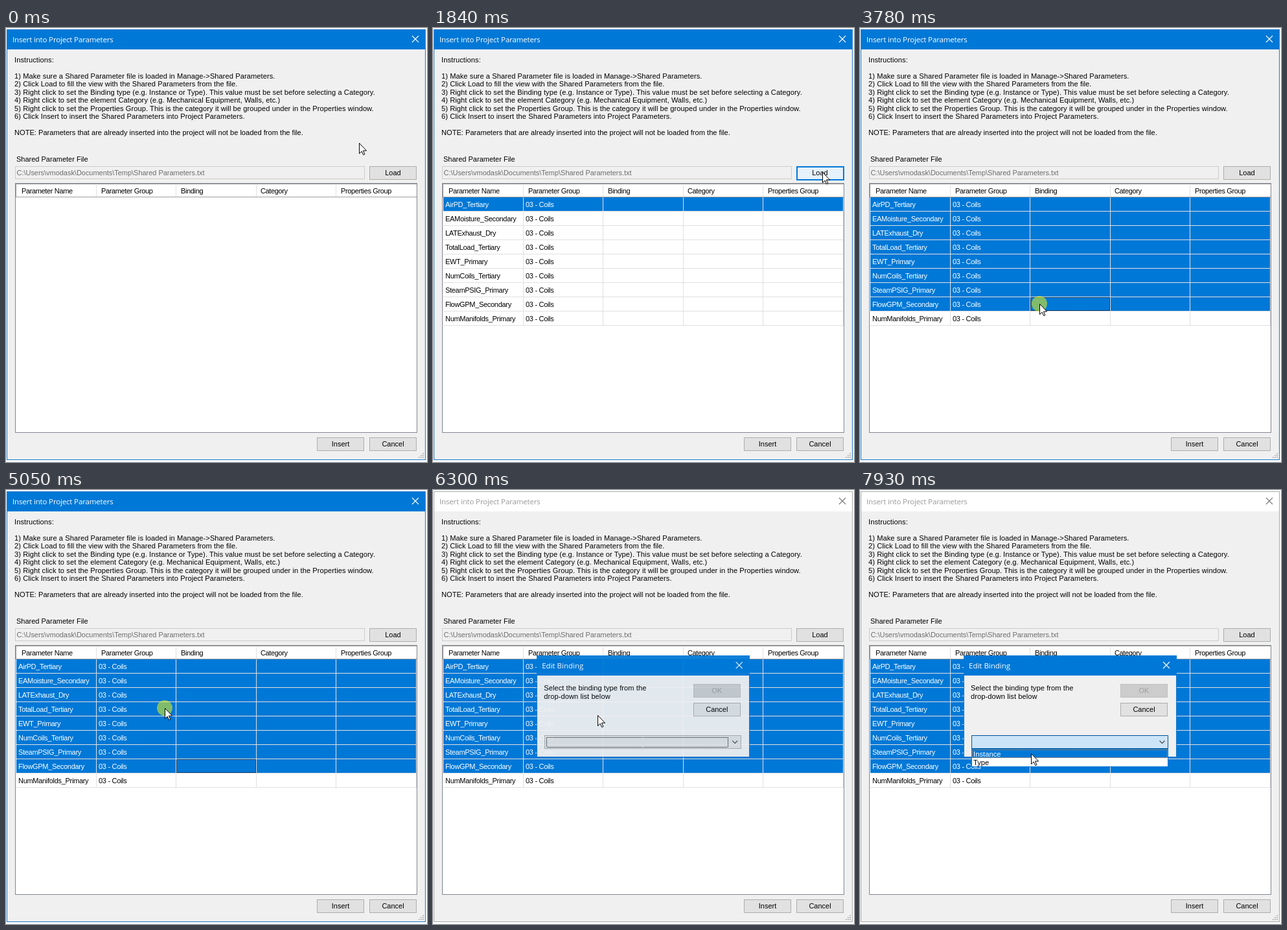
Recreate the animation shown at these times as an HTML page. Size 650 by 669 pixels, loop 8000 ms.

```html
<!DOCTYPE html>
<html lang="en">
<head>
<meta charset="utf-8">
<title>Insert into Project Parameters</title>
<style>
html, body { margin: 0; width: 100%; height: 100%; overflow: hidden; background: #fff; }
svg { display: block; width: 650px; height: 669px; font: 11px "Liberation Sans", Arial, sans-serif; }
rect, line { shape-rendering: crispEdges; }
text { white-space: pre; }
.note { font-size: 11.1px; }
.step { font-size: 11.1px; letter-spacing: .075px; }
.ui { font: 11.5px "Open Sans", "Noto Sans", sans-serif; }
.head { letter-spacing: -.36px; }
.cell { letter-spacing: -.3px; }
.mid { text-anchor: middle; }
.gray { fill: #6d6d6d; letter-spacing: -.03px; }
.line { stroke: #e0e0e0; }
.x { fill: none; stroke: #fff; stroke-width: 1.1; }
.dots { fill: none; stroke: #000; stroke-dasharray: 1 1; }

#frame { fill: #f0f0f0; stroke: #1a79c9; }
#bar { fill: #0078d7; }
#title { fill: #fff; letter-spacing: -.15px; }
.inactive #frame { stroke: #a9a9a9; }
.inactive #bar { fill: #fff; }
.inactive #title { fill: #999; }
.inactive #close { stroke: #777; }

.btn rect { fill: #e1e1e1; stroke: #adadad; }
.off rect { fill: #ccc; stroke: #bfbfbf; }
.off text { fill: #a0a0a0; }
.focus #load rect { stroke: #0078d7; stroke-width: 2; }
.hover #load rect { fill: #e5f1fb; stroke: #0078d7; }
.press #load rect { fill: #cce4f7; stroke: #005499; }

#rows, #cellFocus, #menu, #pick, #list, #ring { visibility: hidden; }
.loaded #rows, .cellFocus #cellFocus, .menu #menu, .pick #pick, .list #list, .ring #ring { visibility: visible; }
.row rect { fill: #fff; }
.row:first-child rect, .multi .row:not(:last-child) rect { fill: #0078d7; }
.row:first-child text, .multi .row:not(:last-child) text { fill: #fff; }

#dialog { transform-origin: 324px 333px; }
#combo { fill: #e1e1e1; stroke: #adadad; }
.over #combo { fill: #e5f1fb; stroke: #0078d7; }
.list #combo { fill: #cce4f7; stroke: #005499; }
.list #comboFocus { visibility: hidden; }
#first rect { fill: #fff; }
.choose #first rect { fill: #0078d7; }
.choose #first text { fill: #fff; }
#first .dots { visibility: hidden; }
.choose #first .dots { visibility: inherit; fill: none; stroke: #ff8728; }
</style>
</head>
<body>
<svg id="stage" viewBox="0 0 650 669"></svg>
<script>
const stage = document.getElementById('stage');

// Markup helpers
const text = (x, y, s, cls = '', more = '') =>
  `<text x="${x}" y="${y}" class="${cls}" ${more}>${s.replace(/>/g, '&gt;')}</text>`;
const fill = (x, y, w, h, color = '', more = '') =>
  `<rect x="${x}" y="${y}" width="${w}" height="${h}" ${color && `fill="${color}"`} ${more}/>`;
const box = (x, y, w, h, more = '') => fill(x + .5, y + .5, w - 1, h - 1, '', more);
const line = (x1, y1, x2, y2, color) =>
  `<line x1="${x1}" y1="${y1}" x2="${x2}" y2="${y2}" ${color ? `stroke="${color}"` : 'class="line"'}/>`;
const button = (x, y, label, id = '', cls = '') =>
  `<g class="btn ${cls}" id="${id}">${box(x, y, 73, 21)}${text(x + 36.5, y + 14, label, 'mid')}</g>`;
const cross = (x, y, id) =>
  `<path class="x" id="${id}" d="M${x - 5} ${y - 5}l10 10m0-10l-10 10"/>`;

const notes = [
  '1) Make sure a Shared Parameter file is loaded in Manage->Shared Parameters.',
  '2) Click Load to fill the view with the Shared Parameters from the file.',
  '3) Right click to set the Binding type (e.g. Instance or Type). This value must be set before selecting a Category.',
  '4) Right click to set the element Category (e.g. Mechanical Equipment, Walls, etc.)',
  '5) Right click to set the Properties Group. This is the category it will be grouped under in the Properties window.',
  '6) Click Insert to insert the Shared Parameters into Project Parameters.'
];
const heads = ['Parameter Name', 'Parameter Group', 'Binding', 'Category', 'Properties Group'];
const headX = [24, 147, 270, 393, 517];
const colX = [139, 262, 386, 509];
const params = ['AirPD_Tertiary', 'EAMoisture_Secondary', 'LATExhaust_Dry', 'TotalLoad_Tertiary',
  'EWT_Primary', 'NumCoils_Tertiary', 'SteamPSIG_Primary', 'FlowGPM_Secondary', 'NumManifolds_Primary'];

const grip = [[0, 2], [1, 1], [1, 2], [2, 0], [2, 1], [2, 2]]
  .map(([c, r]) => fill(637 + c * 3, 655 + r * 3, 2, 2, '#bfbfbf')).join('');

const frame = box(1, 2, 647, 664, 'id="frame"') + fill(2, 3, 645, 30, '', 'id="bar"') +
  text(10, 22, 'Insert into Project Parameters', 'ui', 'id="title"') + cross(632, 17, 'close') +
  text(13, 53, 'Instructions:', 'step') +
  notes.map((s, i) => text(13, 78 + i * 12.4, s, 'step')).join('') +
  text(13, 165, 'NOTE: Parameters that are already inserted into the project will not be loaded from the file.', 'note') +
  text(16, 206, 'Shared Parameter File') +
  box(14, 213, 540, 20, 'fill="#f0f0f0" stroke="#ccc"') +
  text(16.5, 227, 'C:\\Users\\vmodask\\Documents\\Temp\\Shared Parameters.txt', 'gray') +
  button(561, 213, 'Load', 'load') + button(480, 631, 'Insert') + button(561, 631, 'Cancel') + grip;

const row = (name, i) => {
  const y = 261 + i * 22;
  return `<g class="row">${fill(16, y, 617, 21)}${text(19, y + 15, name, 'cell')}${text(143, y + 15, '03 - Coils', 'cell')}</g>`;
};
const bottom = 261 + params.length * 22;
const grid = box(14, 239, 621, 385, 'fill="#fff" stroke="#828790"') +
  line(15, 240.5, 634, 240.5, '#a0a0a0') + line(15.5, 240, 15.5, 261, '#a0a0a0') +
  line(15, 260.5, 634, 260.5, '#a0a0a0') +
  colX.map(x => line(x + .5, 242, x + .5, 260)).join('') +
  heads.map((s, i) => text(headX[i], 255, s, 'head')).join('') +
  `<g id="rows"><g>${params.map(row).join('')}</g>` +
  params.map((_, i) => line(16, 282.5 + i * 22, 634, 282.5 + i * 22)).join('') +
  [...colX, 633].map(x => line(x + .5, 261, x + .5, bottom)).join('') + '</g>' +
  box(263, 415, 123, 21, 'class="dots" id="cellFocus"');

const menu = `<g id="menu">${box(245, 336, 202, 101, 'fill="#fbfbfb" stroke="#909090"')}` +
  fill(247, 338, 25, 97, '#f1f1f1') +
  box(248, 338, 196, 22, 'id="pick" fill="#b3d7f3" stroke="#0078d7"') +
  ['Edit Binding', 'Edit Category', 'Edit Properties Group', 'Remove']
    .map((s, i) => text(279, 353 + i * 22 + (i > 2 ? 7 : 0), s, 'ui')).join('') +
  line(275, 407.5, 444, 407.5, '#d0d0d0') + '</g>';

const dialog = '<g id="dialog">' + box(160, 255, 329, 157, 'fill="#f0f0f0" stroke="#1a79c9"') +
  fill(160, 255, 329, 31, '#0078d7') + text(168, 275, 'Edit Binding', 'ui', 'fill="#fff"') + cross(473, 270, 'shut') +
  text(171, 309, 'Select the binding type from the', 'step') + text(171, 322, 'drop-down list below', 'step') +
  button(402, 299, 'OK', '', 'off') + button(402, 328, 'Cancel') +
  box(172, 378, 304, 21, 'id="combo"') + box(175, 381, 281, 16, 'class="dots" id="comboFocus"') +
  '<path d="M462.5 386.5l4 4 4-4" fill="none" stroke="#444" stroke-width="1.1"/></g>';

const list = `<g id="list">${box(172, 399, 304, 28, 'fill="#fff" stroke="#0078d7"')}` +
  `<g id="first">${fill(173, 400, 302, 13)}${box(173, 400, 302, 13, 'class="dots"')}${text(175, 411, 'Instance', 'step')}</g>` +
  text(175, 424, 'Type', 'step') + '</g>';

const pointer = '<g id="pointer"><circle id="ring" r="12" fill="#ff0" opacity=".5"/>' +
  '<path d="M.5 .5V16.6L4.2 13.1 6.7 18.6 8.9 17.6 6.4 12.1H11.6Z" fill="#fff" stroke="#000"/></g>';

stage.innerHTML = frame + grid + menu + dialog + list + pointer;
const pointerEl = document.getElementById('pointer');
const dialogEl = document.getElementById('dialog');

// Screen refreshes: start, end, count
const ticks = [0];
for (const [a, b, n] of [[60, 840, 11], [1300, 1380, 2], [1840, 2620, 11], [2710, 3490, 11], [3780, 3870, 2],
  [4330, 4880, 8], [5050, 5200, 2], [5520, 5750, 4], [5900, 5900, 1], [6060, 6370, 5],
  [6680, 7460, 11], [7540, 7930, 6]])
  for (let k = 0; k < n; k++) ticks.push(n > 1 ? a + (b - a) * k / (n - 1) : a);

// Pointer path: time, x, y
const path = [
  [0, 545, 177], [840, 607, 220], [1770, 607, 220], [2250, 452, 266], [2620, 349, 330], [2710, 335, 352],
  [3180, 286, 431], [3490, 277, 425], [4255, 277, 425], [4880, 245, 336], [5440, 245, 336], [5750, 254, 347],
  [6600, 254, 347], [7226, 262, 386], [7460, 262, 387], [7930, 264, 406], [8000, 264, 406]
];
const slope = (i, c) => (path[i + 1][c] - path[i][c]) / (path[i + 1][0] - path[i][0]);
const tangent = (i, c) => {
  if (i < 1 || i > path.length - 2) return 0;
  const a = slope(i - 1, c), b = slope(i, c);
  return a * b > 0 ? 2 * a * b / (a + b) : 0;
};
// Monotone cubic between path points
function at(t, c) {
  let i = 0;
  while (i < path.length - 2 && path[i + 1][0] <= t) i++;
  const [p, q] = [path[i], path[i + 1]], h = q[0] - p[0], u = (t - p[0]) / h, v = 1 - u;
  return v * v * (1 + 2 * u) * p[c] + u * u * (3 - 2 * u) * q[c] +
    h * u * v * (v * tangent(i, c) - u * tangent(i + 1, c));
}

const clicks = [[1300, 1380], [3780, 3870], [5050, 5200], [5900, 6060], [7300, 7380]];

function draw(now) {
  const real = now % 8000;
  const t = ticks.filter(s => s <= real + .01).pop();
  const x = Math.round(at(t, 1)), y = Math.round(at(t, 2));
  const within = (a, b) => t >= a && t < b;
  const states = {
    loaded: t >= 1380,
    focus: within(1300, 3780),
    hover: x >= 561 && y >= 213 && y < 234,
    press: within(1300, 1380),
    multi: t >= 3780,
    cellFocus: within(3780, 6060),
    menu: within(5200, 6060),
    pick: within(5200, 6060) && y >= 338,
    inactive: t >= 6060,
    over: t >= 6370 && y >= 378,
    list: t >= 7380,
    choose: t >= 7380 && y >= 400,
    ring: clicks.some(c => within(...c))
  };
  stage.setAttribute('class', Object.keys(states).filter(k => states[k]).join(' '));
  pointerEl.setAttribute('transform', `translate(${x} ${y})`);
  const left = 1 - Math.min(1, Math.max(0, (t - 6060) / 310));
  dialogEl.style.opacity = 1 - left * left;
  dialogEl.style.transform = left ? `scale(${1 - .1 * left ** 3})` : 'none';
}

let start;
function tick(now) {
  start ??= now;
  draw(now - start);
  requestAnimationFrame(tick);
}
draw(0);
requestAnimationFrame(tick);
</script>
</body>
</html>
```
